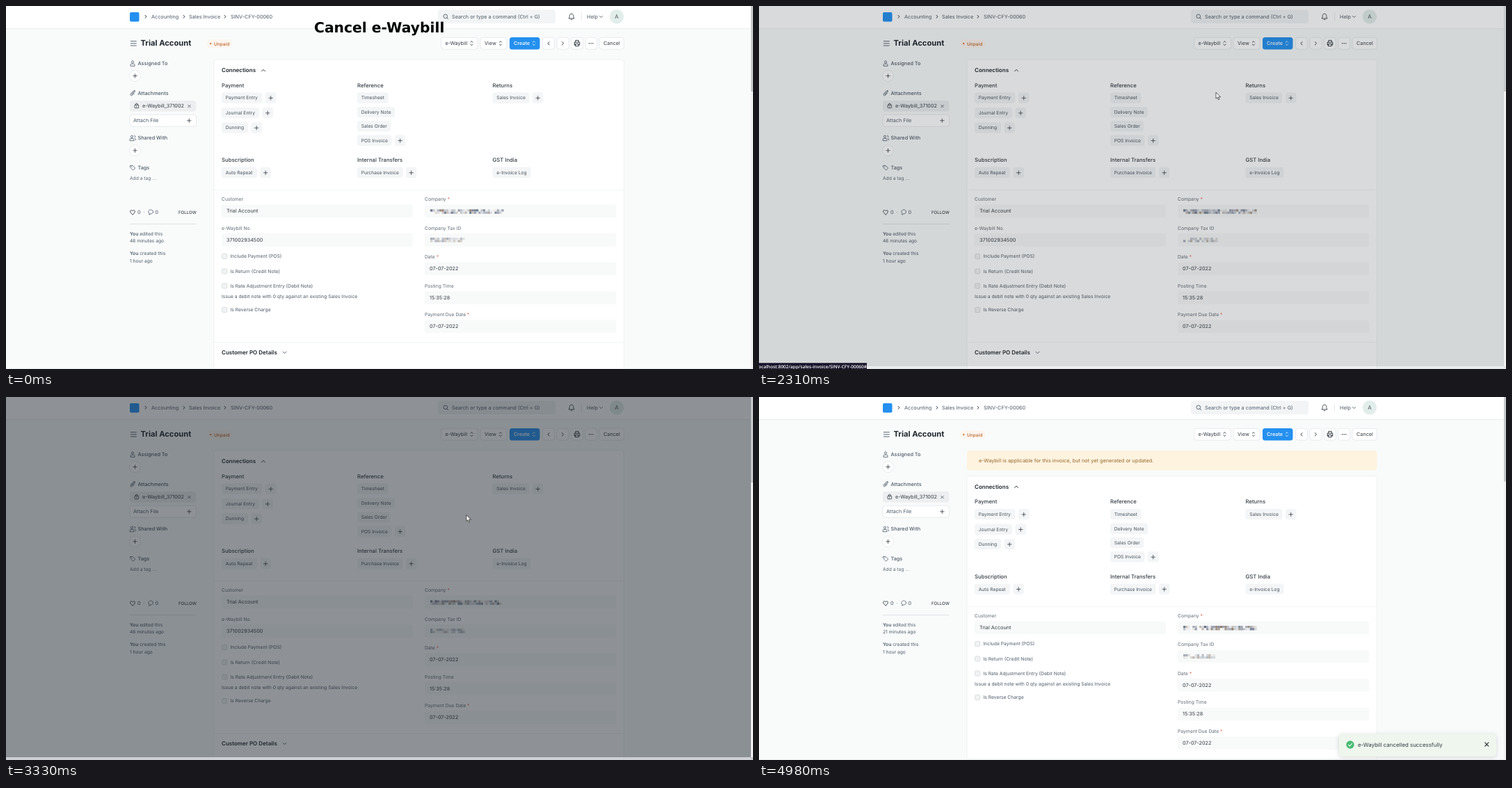
An HTML page for the animation above (5330 ms loop, 1074 px wide and 522 px high).

```html
<!DOCTYPE html>
<html lang="en">
<head>
<meta charset="utf-8">
<title>Cancel e-Waybill</title>
<style>
html, body { margin: 0; width: 100%; height: 100%; overflow: hidden; background: #f9fbfb; }
svg { display: block; width: 1074px; height: 522px; font-family: Inter, sans-serif; text-rendering: geometricPrecision; }
</style>
</head>
<body>
<svg id="stage" viewBox="0 0 1074 522"></svg>
<script>
const INK = '#1f272e', TEXT = '#4c5a67', SOFT = '#5f6b75', BLUE = '#2490ef', FIELD = '#f8f9f9';
const LOOP = 5330, CUT = 4260;
const CLIENT = 'Trial Account', FIRM = 'Mirandolava Alloy Enterprises';

// cy is the middle of the capitals
function text(x, cy, str, size = 7.27, fill = TEXT, weight = 400, extra = '') {
  return `<text x="${x}" y="${cy + size * .364}" font-size="${size}" fill="${fill}" font-weight="${weight}" ${extra}>${str}</text>`;
}
function rect(x, y, w, h, fill, r = 0, stroke = 'none', extra = '') {
  return `<rect x="${x}" y="${y}" width="${w}" height="${h}" rx="${r}" fill="${fill}" stroke="${stroke}" stroke-width=".7" ${extra}/>`;
}
function path(d, stroke = TEXT, width = .8, fill = 'none') {
  return `<path d="${d}" fill="${fill}" stroke="${stroke}" stroke-width="${width}" stroke-linecap="round" stroke-linejoin="round"/>`;
}
const circle = (x, y, r, fill, stroke = 'none', width = .7) =>
  `<circle cx="${x}" cy="${y}" r="${r}" fill="${fill}" stroke="${stroke}" stroke-width="${width}"/>`;
const group = (id, body, extra = '') => `<g id="${id}" ${extra}>${body}</g>`;
const plus = (x, y, s = 2.7) => path(`M${x - s} ${y}h${2 * s}M${x} ${y - s}v${2 * s}`, '#333c44', .8);
const cross = (x, y, s, c = INK, w = .9) => path(`M${x - s} ${y - s}l${2 * s} ${2 * s}m0 ${-2 * s}l${-2 * s} ${2 * s}`, c, w);
const right = (x, y, s = 2.2) => path(`M${x - s / 2} ${y - s}l${s} ${s}l${-s} ${s}`, '#333c44', 1);
const left = (x, y, s = 2.2) => path(`M${x + s / 2} ${y - s}l${-s} ${s}l${s} ${s}`, '#333c44', 1);
const down = (x, y, s = 2) => path(`M${x - s} ${y - s / 2}l${s} ${s}l${s} ${-s}`, TEXT, .9);
const up = (x, y, s = 2) => path(`M${x - s} ${y + s / 2}l${s} ${-s}l${s} ${s}`, INK, .9);
const upDown = (x, y, c = INK) => path(`M${x - 1.6} ${y - 1.4}l1.6 -1.6l1.6 1.6M${x - 1.6} ${y + 1.4}l1.6 1.6l1.6 -1.6`, c, .8);

function header() {
  return rect(0, 0, 1074, 32.5, '#fff') + rect(0, 32.3, 1074, .8, '#e6eaeb')
    + rect(178, 9, 13.5, 13.5, BLUE, 2)
    + [201, 256, 315].map(x => right(x, 15.3, 2)).join('')
    + text(209, 15, 'Accounting') + text(263, 15, 'Sales Invoice') + text(323, 15, 'SINV-CFY-00060')
    + rect(621, 5.5, 169, 19.5, '#f2f4f5', 4)
    + circle(631.8, 14.8, 2.8, 'none', TEXT, .9) + path('M634 17l1.7 1.7', TEXT, .9)
    + text(641, 15.3, 'Search or type a command (Ctrl + G)')
    + path('M809.3 17.7c1.2-1.2.8-2.8 1-4c.5-3.4 5-3.4 5.5 0c.2 1.2-.2 2.8 1 4zM812 19.2c.4 1 1.8 1 2.2 0', INK)
    + rect(827, 9, .7, 12.5, '#dde1e4')
    + text(835, 15.3, 'Help') + down(855.5, 15.5)
    + circle(878, 15.2, 10.2, '#e2eeea') + text(878, 15.4, 'A', 8, '#505a62', 400, 'text-anchor="middle"');
}

function button(x, w, label = '', arrows) {
  return rect(x, 45.2, w, 17, '#fff', 3.5, '#dfe3e6') + (label ? text(x + 6, 53.6, label, 7.27, '#333c44') : '')
    + (arrows ? upDown(x + w - 9, 53.6) : '');
}

function toolbar() {
  const print = path('M818.8 52v-2.6h4.4v2.6M818.8 56h-1.6v-3.9h7.6v3.9h-1.6M818.8 54.6h4.4v3h-4.4z', INK, .9);
  return path('M179.3 50.6h8M179.3 53.8h8M179.3 57h8', TEXT, .9)
    + text(193.5, 53.4, CLIENT, 11.2, INK, 700)
    + rect(289, 48, 36.5, 12.3, '#fdf5ef', 6) + circle(294.2, 54.2, 1.1, '#d2691e')
    + text(299, 54.3, 'Unpaid', 6.5, '#b9652b', 500)
    + button(625.5, 53, 'e-Waybill', 1).replace('<rect', '<rect id="ewayBtn"')
    + button(682, 38, 'View', 1)
    + rect(724, 45, 43.5, 17.5, BLUE, 3.5) + text(730, 53.6, 'Create', 7.27, '#fff', 500) + upDown(759, 53.6, '#fff')
    + button(771.5, 17) + left(780, 53.8) + button(792, 17) + right(800.5, 53.8)
    + button(812.5, 17) + print
    + button(833, 16.7) + [838.6, 841.2, 843.8].map(x => circle(x, 53.8, .7, INK)).join('')
    + button(853, 35.5, 'Cancel');
}

function sidebar() {
  const head = (y, s) => text(189.5, y, s, 7.27, TEXT, 500);
  const add = y => circle(185.5, y, 8, '#fff', '#dfe3e6') + plus(185.5, y);
  const person = (x, y) => circle(x, y - 2, 1.6, 'none', TEXT, .8) + path(`M${x - 3} ${y + 3.5}v-1.2q0-1.6 1.6-1.6h2.8q1.6 0 1.6 1.6v1.2z`);
  return person(182, 82.5) + head(82.5, 'Assigned To') + add(100.5)
    + path('M184.5 122.5l-3.6 3.6q-.7 1.2.5 1.2l3.7-3.7q1.4-2.5-1.2-2.2l-4 4q-2 3 .7 3.6l3.6-3.2') + head(125.3, 'Attachments')
    + rect(178, 136, 95.3, 15.5, '#eceeef', 3.5)
    + rect(185, 142.3, 5.6, 4.4, 'none', .8, INK) + path('M186.2 142.2v-1.2q1.6-2 3.2 0v1.2M187.8 144v1', INK)
    + text(196, 143.8, 'e-Waybill_371002', 7.27, '#333c44', 400, 'clip-path="url(#fileClip)"') + cross(263.5, 144, 1.8, TEXT, .8)
    + rect(178, 156.2, 95.5, 17, '#fff', 3.5, '#dfe3e6') + text(183, 164.8, 'Attach File') + plus(263.3, 164.8)
    + person(181, 189.8) + path('M184.6 186q2 .4 1 2.8M185.6 190.2q1 .4.9 2.6') + head(189.6, 'Shared With') + add(207.8)
    + path('M178.8 229.5h3.4l3.5 3.6l-3 3l-3.9-3.8z') + circle(180.7, 231.2, .6, TEXT) + head(232.5, 'Tags')
    + text(178, 247.7, 'Add a tag ...', 6.71, SOFT)
    + path('M182 300l-3-3.2c-1.6-2.3 1.4-4.5 3-2c1.6-2.5 4.6-.3 3 2z', INK) + text(189, 296.6, '0')
    + text(197.5, 296.6, '·') + path('M205.8 299.8l.2-1.6c-3-3 .3-5.4 2.3-5.2c4.4.3 4.2 5.8 0 5.9z', TEXT) + text(214.5, 296.6, '0')
    + text(248, 296.4, 'FOLLOW', 6.1, INK) + rect(178, 313.2, 95.5, .7, '#d4dadd')
    + text(178, 327.4, '<tspan font-weight="600">You</tspan> edited this', 6.71, TEXT)
    + text(178, 337.5, '', 6.71, TEXT, 400, 'id="edited"')
    + text(178, 356, '<tspan font-weight="600">You</tspan> created this', 6.71, TEXT)
    + text(178, 366.2, '1 hour ago', 6.71);
}

// label, x, cy, width, has a plus button
const CHIPS = [
  ['Payment Entry', 310, 132, 58.5, 1], ['Journal Entry', 310, 153.6, 54, 1], ['Dunning', 310, 175, 38, 1],
  ['Timesheet', 505, 132, 44.5], ['Delivery Note', 505, 152.6, 54], ['Sales Order', 505, 172.8, 48], ['POS Invoice', 505, 193.3, 49.5, 1],
  ['Sales Invoice', 699.5, 132, 53, 1], ['Auto Repeat', 310, 239.5, 51, 1],
  ['Purchase Invoice', 505, 239.5, 65.5, 1], ['e-Invoice Log', 699.5, 239.5, 55]
];
const chip = ([label, x, y, w, add]) => rect(x, y - 7.7, w, 15.4, '#f3f5f6', 3.5) + text(x + 5.7, y, label, 6.71, '#46525d')
  + (add ? rect(x + w + 4.5, y - 7.7, 15.4, 15.4, '#f3f5f6', 3.5) + plus(x + w + 12.2, y + .3) : '');

function field(x, row, label, value, need) {
  const y = 277.6 + 41.5 * row, star = need ? ' <tspan fill="#e8694f">*</tspan>' : '';
  return text(x, y, label + star, 6.75, SOFT) + rect(x, y + 8, 275, 18.6, FIELD, 3)
    + text(x + 7, y + 17.1, value, 7.27, '#333c44');
}
const check = (y, label) => rect(310.6, y - 3.6, 7.2, 7.2, '#f1f3f4', 1.8, '#cdd3d6') + text(322.5, y, label, 6.75);

// pixelated cover for a private value
function mosaic(x, y, w, pale, seed) {
  const rnd = () => (seed = seed * 16807 % 2147483647) / 2147483647;
  let out = '';
  for (let i = 0; i < w; i += 3.3) for (let j = 0; j < 2; j++) {
    const shade = rnd(), hue = [215, 225, 30, 210][rnd() * 4 | 0];
    if (rnd() < .84) out += rect(x + i, y + j * 3.2, 3.3, 3.2, `hsl(${hue} 12% ${pale + shade * (94 - pale)}%)`);
  }
  return out;
}

function card() {
  const heads = [['Payment', 310, 114], ['Reference', 505, 114], ['Returns', 699.5, 114],
    ['Subscription', 310, 221.5], ['Internal Transfers', 505, 221.5], ['GST India', 699.5, 221.5]];
  return rect(299, 77, 589.5, 480, '#fff', 4, '#e9eded')
    + text(310, 92, 'Connections', 8, INK, 600) + up(370, 92.6, 2.5)
    + heads.map(([s, x, y]) => text(x, y, s, 7.72, '#333c44', 500)).join('') + CHIPS.map(chip).join('')
    + rect(299, 264.3, 589.5, .7, '#edf0f0')
    + field(310, 0, 'Customer', CLIENT)
    + group('waybillNo', field(310, 1, 'e-Waybill No.', '371002934500'))
    + group('checks', check(360, 'Include Payment (POS)') + check(381.5, 'Is Return (Credit Note)')
      + check(402.5, 'Is Rate Adjustment Entry (Debit Note)')
      + text(310, 417.8, 'Issue a debit note with 0 qty against an existing Sales Invoice', 6.75)
      + check(437, 'Is Reverse Charge'))
    + field(602, 0, 'Company', '', 1) + field(602, 1, 'Company Tax ID', '')
    + field(602, 2, 'Date', '07-07-2022', 1) + field(602, 3, 'Posting Time', '15:35:28') + field(602, 4, 'Payment Due Date', '07-07-2022', 1)
    + group('masks', '')
    + group('bare', text(609, 294.6, FIRM, 7.27, '#333c44') + text(609, 336, 'BKTPN4821M', 7.27, '#6a737b')
      + rect(609, 336.6, 42, 4, FIELD) + rect(611, 335.2, 46, 1.2, '#b9bec2'))
    + rect(299, 483.2, 589.5, .7, '#edf0f0')
    + text(310, 498, 'Customer PO Details', 8, INK, 600) + down(400.5, 498.4, 2.5);
}

function modal() {
  return rect(373, 14, 324, 171, '#fff', 5)
    + text(384.5, 32.3, 'Cancel e-Waybill', 8.85, INK, 500) + cross(680.2, 30.5, 2.7, INK, 1.1)
    + rect(373, 49.8, 324, .7, '#e8ecee')
    + text(384.5, 64.3, 'Reason <tspan fill="#c0504a">*</tspan>', 6.75, SOFT) + rect(384.5, 72.5, 300.7, 18.8, '#f3f5f6', 3.5)
    + text(391, 81.8, 'Data Entry Mistake', 7.35, INK) + upDown(674, 82)
    + text(384.5, 106, 'Remark', 6.75, SOFT) + rect(384.5, 114, 300.7, 18.6, '#f3f5f6', 3.5)
    + rect(373, 149.8, 324, .7, '#e8ecee')
    + rect(649.5, 159, 36, 17, BLUE, 3.5) + text(667.5, 167.5, 'Cancel', 7.27, '#fff', 500, 'text-anchor="middle"');
}

const menu = rect(626, 66, 75, 69, '#fff', 4, '#e2e6e8') + rect(629, 114, 69, 19, '#f0f2f3', 3, 'none', 'id="menuHover"')
  + ['Print', 'Attach', 'Cancel'].map((s, i) => text(634, 80 + i * 22, s, 7.27, '#333c44')).join('');

const toast = rect(834, 485, 226, 32, '#eff6ee', 4, 'none', 'style="filter:drop-shadow(0 1px 3px rgba(30,40,50,.18))"')
  + circle(850, 500, 5.7, '#48bb74') + path('M847.5 500.2l1.8 1.8l3.3-3.6', '#fff', 1.1)
  + text(861, 500, 'e-Waybill cancelled successfully', 7.9, '#333c44') + cross(1046.3, 499.5, 2.6, INK, 1.1);

const stage = document.getElementById('stage');
stage.innerHTML = '<clipPath id="fileClip"><rect x="190" y="136" width="67" height="16"/></clipPath>'
  + rect(0, 0, 1074, 522, '#f9fbfb')
  + group('page', rect(-5, 0, 5, 33, '#fff') + header() + toolbar() + sidebar()
    + group('banner', rect(299, 77, 589.5, 28.5, '#fef3df', 4)
      + text(316, 91.3, 'e-Waybill is applicable for this invoice, but not yet generated or updated.', 7.35, '#97692f'))
    + group('card', card()) + group('menu', menu))
  + rect(0, 521, 1074, 1, '#e9edee')
  + group('scroll', rect(1070.7, 0, 3.3, 522, '#f1f1f1') + rect(1071, 0, 3, 123, '#c6c8c9', 0, 'none', 'id="thumb"'))
  + group('strip', rect(0, 518, 1074, 4, '#cdd0d4'))
  + rect(0, 0, 1071, 518, '#1f272e', 0, 'none', 'id="shade"')
  + group('link', rect(0, 513.3, 155, 8.7, '#17132a')
    + text(-2.5, 518.8, 'localhost:8002/app/sales-invoice/SINV-CFY-00060#', 6.5, '#fff', 600, 'font-family="Open Sans, sans-serif"'))
  + group('modal', modal()) + group('toast', toast)
  + text(443, 30.3, 'Cancel e-Waybill', 20.3, '#000', 700, 'id="caption" font-family="DejaVu Sans, sans-serif"')
  + group('cursor',
    group('arrow', path('M0 0v8.6l2-1.9l1.5 3.4l1.4-.6l-1.5-3.3h2.8z', '#222', .7, '#fff'))
    + group('hand', path('M-.8 5.8v-5q.9-1.2 1.8 0v3.2l3.4.8q1 .3.8 1.4l-.6 3.6q-.2 1.2-1.4 1.2h-2.6q-.8 0-1.3-.8l-2.2-3.4q.5-1.2 2.1 0zM2.6 4.4v1.6M4 4.8v1.4', '#222', .7, '#fff'))
    + group('beam', path('M-2 -4.5q2 0 2 1q0-1 2-1M0-3.5v7M-2 4.5q2 0 2-1q0 1 2 1', '#111', .8)));

const el = {};
stage.querySelectorAll('[id]').forEach(n => el[n.id] = n);
const show = (n, on) => n.setAttribute('visibility', on ? 'inherit' : 'hidden');
const move = (n, x, y) => n.setAttribute('transform', `translate(${x} ${y})`);
const ramp = (t, a, b) => Math.min(1, Math.max(0, (t - a) / (b - a)));
const smooth = p => p * p * (3 - 2 * p);

// time, x, y of the pointer tip
const TRAIL = [
  [800, 1045, 519], [801, 1045, 519], [1000, 1015, 490], [1200, 1015, 490], [1650, 653, 56], [1770, 653, 56], [2130, 657, 124], [2430, 657, 125],
  [2490, 657, 129], [2670, 558, 134], [2760, 559, 134], [2970, 664, 167], [3120, 664, 167], [3240, 662, 170],
  [3480, 662, 170], [3630, 663, 177], [4080, 977, 503], [LOOP, 977, 503]
];
function pointer(t) {
  const i = TRAIL.findIndex(k => k[0] > t), a = TRAIL[i - 1], b = TRAIL[i];
  if (!a) return [TRAIL[0][1], TRAIL[0][2]];
  const p = smooth(ramp(t, a[0], b[0]));
  return [a[1] + (b[1] - a[1]) * p, a[2] + (b[2] - a[2]) * p];
}

let maskKey;
function drawMasks(t) {
  const key = t < 2280 ? 77 : t < 2640 ? 1201 : t < 3240 ? 5309 : t < CUT ? 911 : 4242;
  if (key === maskKey) return;
  maskKey = key;
  el.masks.innerHTML = mosaic(610, 292.4, 105, 48, key) + mosaic(610, 333.2, 47, 68, key + 31);
}

function draw(time) {
  const step = time < 1200 ? 200 : 30;
  const t = Math.floor(time / step) * step;
  const done = t >= CUT, bare = t >= 3660 && !done, wide = t >= 2430 && t < 3240;
  const [x, y] = pointer(t);

  show(el.caption, t < 1200);
  move(el.page, wide ? 3.5 : 0, 0);
  move(el.card, 0, done ? 36.6 : 0);
  move(el.checks, 0, done ? -41.6 : 0);
  show(el.waybillNo, !done);
  show(el.banner, done);
  show(el.toast, done);
  show(el.masks, !bare);
  show(el.bare, bare);
  drawMasks(t);
  el.edited.textContent = (done ? 21 : bare ? 47 : 46) + ' minutes ago';
  el.thumb.setAttribute('height', done ? 121.5 : 123);

  const onButton = t >= 1200 && t < 2280 && x < 679 && y > 44 && y < 63;
  el.ewayBtn.setAttribute('fill', onButton || (t >= 1800 && t < 2280) ? '#dde3e2' : '#fff');
  show(el.menu, t >= 1800 && t < 2280);
  show(el.menuHover, t >= 1800 && t < 2280 && y > 113);
  show(el.link, t >= 2070 && t < 2430);

  const dim = ramp(t, 2250, 2430) * (1 - ramp(t, 3510, 3600));
  el.shade.setAttribute('opacity', dim * .5);
  el.shade.setAttribute('width', wide ? 1074 : 1071);
  el.shade.setAttribute('height', wide ? 521 : 518);
  show(el.scroll, !wide);
  show(el.strip, !wide && dim > 0);
  el.strip.setAttribute('opacity', dim);

  const enter = ramp(t, 2400, 2580), leave = ramp(t, 3090, 3210);
  el.modal.setAttribute('opacity', enter * (1 - leave));
  move(el.modal, 0, -28 * (1 - smooth(enter) + smooth(leave)));

  const beam = wide && t > 2520 && x < 640 && y < 138;
  const hand = onButton || (t >= 1650 && t < 2280) || (t >= 2910 && t < 3120);
  const pointing = t >= 800 && !done;
  show(el.beam, pointing && beam);
  show(el.hand, pointing && hand);
  show(el.arrow, pointing && !beam && !hand);
  move(el.cursor, x, y);
}

const start = performance.now();
function tick() {
  draw((performance.now() - start) % LOOP);
  requestAnimationFrame(tick);
}
tick();
</script>
</body>
</html>
```
